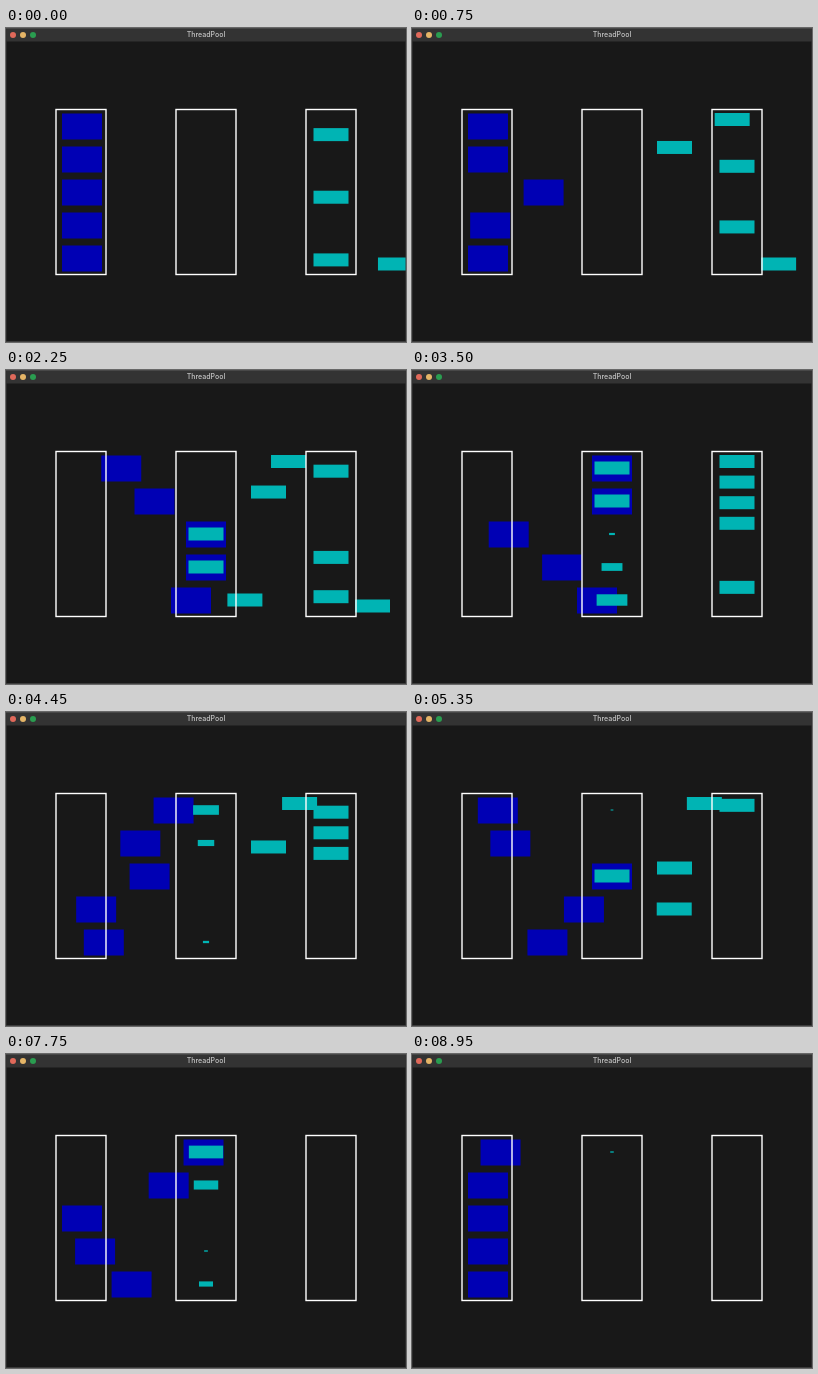
An HTML page with a canvas for the animation above (9 s loop, 400x314 px).

```html
<!DOCTYPE html>
<html>
<head>
<meta charset="utf-8">
<title>ThreadPool</title>
<style>
  html, body { margin: 0; width: 100%; height: 100%; overflow: hidden; background: #181818; }
  canvas { display: block; }
</style>
</head>
<body>
<canvas id="stage" width="400" height="314"></canvas>
<script>
const ctx = document.getElementById('stage').getContext('2d');
const LOOP = 9000, TICK = 58.84, LAST_TICK = 151;

// All durations are in ticks.
const TRAVEL = 22.75, WORK = 15.5, SHIFT = 4.5;
const ROW_GAP = 33, SLOT_GAP = 20.6;
const QUEUE = { x: 307.5, top: 85, bottom: 229.5 };
const LANE_X = 245, DESK_X = 182.5;
const TASK_W = 35, TASK_H = 13;

// row, dispatch time, queue speed, time the head of the queue would be reached
const tasks = [
  [2, 1.8, 8.4], [3, 11.6, 6.7], [4, 18, 7.8], [1, 24.7, 8.46], [0, 30.8, 9.9],
  [2, 62.6, 8.8, 39.1], [3, 72.4, 6.9, 51.9], [4, 79.1, 6.5, 58.8],
  [1, 85.9, 6.2, 68], [0, 92.3, 5.8, 80.7]
].map(([row, start, speed, arrive = start]) => ({ row, start, speed, arrive }));

const clamp = v => Math.max(0, Math.min(1, v));
const lerp = (a, b, p) => a + (b - a) * p;
const outward = (task, n) => clamp((n - task.start) / TRAVEL);
const homeward = (task, n) => clamp((n - task.start - TRAVEL - WORK) / TRAVEL);

function queuePosition(index, n) {
  const task = tasks[index];
  const ahead = tasks.slice(0, index)
    .reduce((sum, t) => sum + 1 - clamp((n - t.start) / SHIFT), 0);
  const left = Math.max(ahead * SLOT_GAP, task.speed * (task.arrive - n));
  const height = QUEUE.bottom - QUEUE.top;
  return [QUEUE.x + Math.max(0, left - height), QUEUE.top + Math.min(left, height)];
}

// Left to the lane, down to the row, left to the desk.
function deliveryPosition(row, p) {
  const y = 91.5 + row * ROW_GAP;
  const side = 44 / (88 + y - QUEUE.top);
  const first = clamp(p / side);
  const down = clamp((p - side) / (1 - 2 * side));
  const last = clamp((p - 1 + side) / side);
  return [lerp(lerp(QUEUE.x, LANE_X, first), DESK_X, last), lerp(QUEUE.top, y, down)];
}

function drawThreads(n) {
  ctx.fillStyle = '#0000b4';
  for (let row = 0; row < 5; row++) {
    const p = tasks.filter(t => t.row === row)
      .reduce((sum, t) => sum + outward(t, n) - homeward(t, n), 0);
    ctx.fillRect(lerp(56, 180, clamp(p)), 85.5 + row * ROW_GAP, 40, 26);
  }
}

function drawTasks(n) {
  ctx.fillStyle = '#00b4b4';
  tasks.forEach((task, i) => {
    const [x, y] = n < task.start
      ? queuePosition(i, n)
      : deliveryPosition(task.row, outward(task, n));
    const scale = 1 - homeward(task, n);
    const w = TASK_W * scale, h = TASK_H * scale;
    ctx.fillRect(x + (TASK_W - w) / 2, y + (TASK_H - h) / 2, w, h);
  });
}

function drawBoxes() {
  ctx.strokeStyle = '#fff';
  ctx.lineWidth = 1.4;
  for (const [x, w] of [[50, 50], [170, 60], [300, 50]]) ctx.strokeRect(x, 81.5, w, 165);
}

function drawWindow() {
  ctx.strokeStyle = '#3c3c3c';
  ctx.lineWidth = 1;
  ctx.strokeRect(0, 0.5, 400, 313);
  ctx.fillStyle = '#333';
  ctx.fillRect(0, 0, 400, 13.5);
  ctx.fillStyle = '#484848';
  ctx.fillRect(0, 0, 400, 1);
  ['#e0695a', '#e5b567', '#2a9d50'].forEach((color, i) => {
    ctx.fillStyle = color;
    ctx.beginPath();
    ctx.arc(7 + 10 * i, 7, 3, 0, 2 * Math.PI);
    ctx.fill();
  });
  ctx.fillStyle = '#c8c8c8';
  ctx.font = '500 7px Inter, sans-serif';
  ctx.textAlign = 'center';
  ctx.fillText('ThreadPool', 200, 9.3);
}

function render() {
  const n = Math.min(LAST_TICK, Math.floor(performance.now() % LOOP / TICK));
  ctx.fillStyle = '#181818';
  ctx.fillRect(0, 0, 400, 314);
  drawThreads(n);
  drawTasks(n);
  drawBoxes();
  drawWindow();
  requestAnimationFrame(render);
}
render();
</script>
</body>
</html>
```
